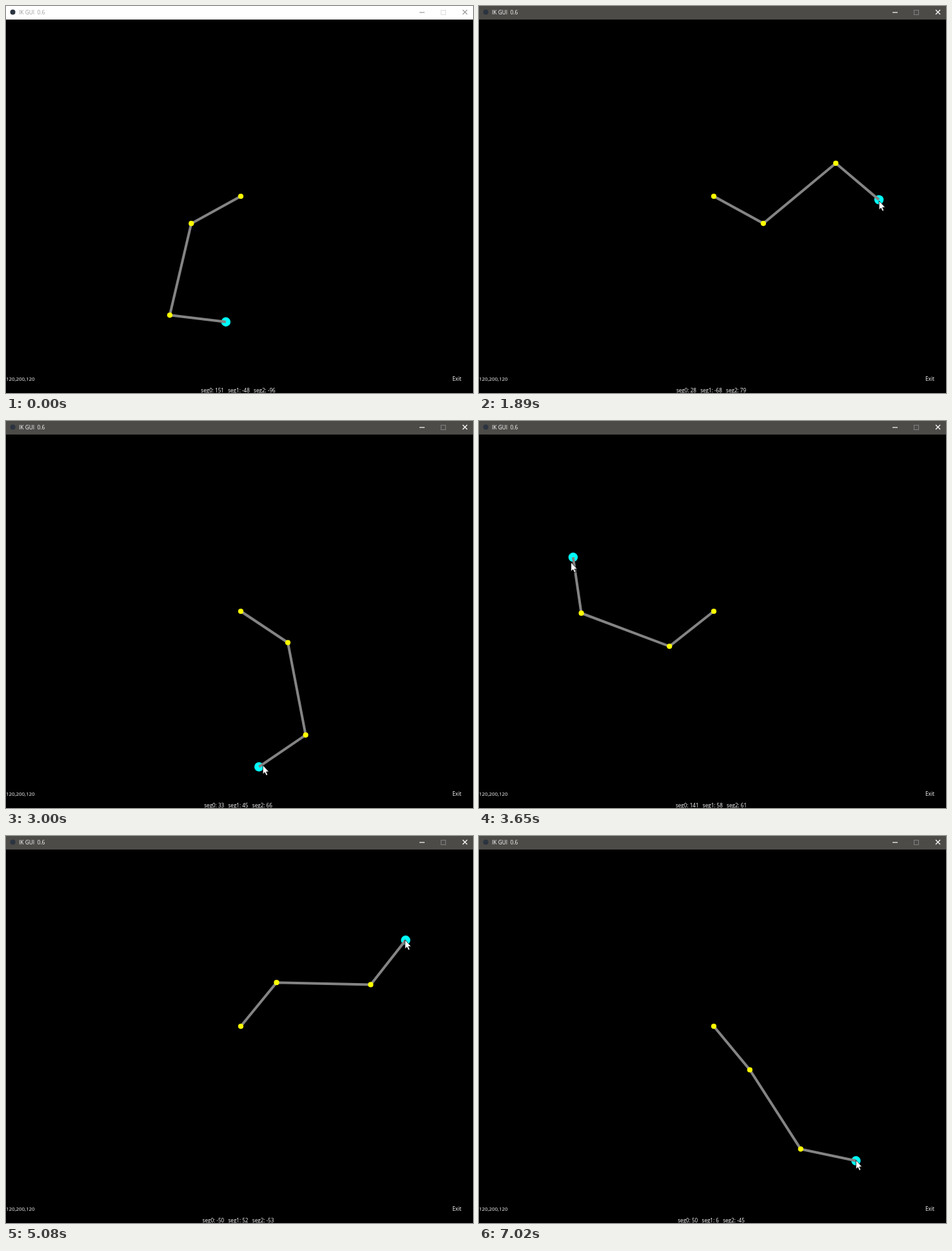
These frames come from a looping animation (724 px wide and 600 px high, 7.07 s). An HTML page with a canvas:

```html
<!DOCTYPE html>
<html lang="en">
<head>
<meta charset="utf-8">
<title>IK GUI</title>
<style>
html, body { margin: 0; width: 100%; height: 100%; overflow: hidden; background: #000; }
canvas { display: block; }
</style>
</head>
<body>
<canvas id="stage" width="724" height="600"></canvas>
<script>
const ctx = document.getElementById('stage').getContext('2d');
const LOOP = 7070, STEPS = 153, GRAB = 10;
const BASE = [364, 295], LENGTHS = [120, 200, 120].map(n => n * 0.73);

// Key poses of the drag: step, then each segment's relative angle in degrees
const POSES = [
  [GRAB, 151.2, -48, -96.4],
  [26, 120.1, -141.4, -45.3],
  [41, 28.7, -68.4, 79.9],
  [65, 33.6, 45.5, 66.6],
  [80, -225, 60, 60],
  [92, -83.7, 79.2, 36.5],
  [96, -35, 35, 20],
  [112, -50, 55, -60],
  [128, 1.6, 74, -74.8],
  [138, -35, 25, -40],
  [152, 50.4, 6.9, -45.3]
];

const clamp = (x, lo, hi) => Math.min(Math.max(x, lo), hi);

function slope(i, k) {
  const a = POSES[i - 1], b = POSES[i + 1];
  return a && b ? (b[k] - a[k]) / (b[0] - a[0]) : 0;
}

// Hermite interpolation through the key poses
function anglesAt(step) {
  const s = clamp(step, GRAB, STEPS - 1);
  const i = Math.max(0, POSES.findIndex(p => p[0] >= s) - 1);
  const a = POSES[i], b = POSES[i + 1], span = b[0] - a[0];
  const u = (s - a[0]) / span, v = 1 - u;
  return [1, 2, 3].map(k =>
    v * v * (1 + 2 * u) * a[k] + u * u * (3 - 2 * u) * b[k] +
    span * u * v * (v * slope(i, k) - u * slope(i + 1, k)));
}

function jointsFor(angles) {
  let [x, y] = BASE, heading = 0;
  const points = [[x, y]];
  angles.forEach((angle, i) => {
    heading += angle * Math.PI / 180;
    x += LENGTHS[i] * Math.cos(heading);
    y += LENGTHS[i] * Math.sin(heading);
    points.push([x, y]);
  });
  return points;
}

function dot([x, y], r, color) {
  ctx.fillStyle = color;
  ctx.beginPath();
  ctx.arc(x, y, r, 0, 7);
  ctx.fill();
}

function line(points, color, width) {
  ctx.strokeStyle = color;
  ctx.lineWidth = width;
  ctx.beginPath();
  points.forEach(p => ctx.lineTo(...p));
  ctx.stroke();
}

function text(str, x, y, color = '#fff', align = 'left', size = 8.1) {
  ctx.font = `${size}px "Open Sans", "Noto Sans", sans-serif`;
  ctx.textAlign = align;
  ctx.fillStyle = color;
  ctx.fillText(str, x, y);
}

function drawTitleBar(active) {
  const ink = active ? '#fff' : '#999';
  ctx.fillStyle = active ? '#4c4b48' : '#fff';
  ctx.fillRect(0, 0, 724, 21);
  dot([10.5, 9.5], 4, '#2c3440');
  text('IK GUI  0.6', 20, 13, ink, 'left', 8.4);
  line([[641, 10], [649, 10]], ink, 1.2);
  ctx.strokeStyle = active ? '#808080' : '#ddd';
  ctx.lineWidth = 1;
  ctx.strokeRect(674.5, 6.5, 7, 7);
  line([[708, 6], [715, 13]], ink, 1.2);
  line([[715, 6], [708, 13]], ink, 1.2);
}

function drawCursor(step) {
  if (step < 3) return;
  // The arm trails slightly behind the pointer
  const [x, y] = jointsFor(anglesAt(step + 0.3))[3];
  const away = Math.max(0, GRAB - step) / 7;
  ctx.save();
  ctx.translate(x + 60 * away, y + 100 * away * away);
  ctx.beginPath();
  [[0, -1], [0, 13], [3, 10.2], [5.2, 15], [7.6, 14], [5.4, 9.4], [9.5, 9.2]]
    .forEach(p => ctx.lineTo(...p));
  ctx.closePath();
  ctx.fillStyle = '#fff';
  ctx.fill();
  ctx.strokeStyle = '#000';
  ctx.lineWidth = 0.8;
  ctx.stroke();
  ctx.restore();
}

const whole = a => Math.trunc(a - 360 * Math.round(a / 360)) || 0;

function draw(step) {
  const angles = anglesAt(step), joints = jointsFor(angles);
  ctx.fillStyle = '#000';
  ctx.fillRect(0, 0, 724, 600);
  drawTitleBar(step >= GRAB);

  dot(joints[3], 7.2, '#0ff');
  line(joints, '#848484', 4);
  joints.slice(0, 3).forEach(p => dot(p, 4.1, '#ff0'));

  text('120,200,120', 0, 581, '#fff', 'left', 7.9);
  text('Exit', 699, 581, '#fff', 'center', 8.4);
  text(angles.map((a, i) => `seg${i}: ${whole(a)}`).join('   '), 360, 598.5, '#fff', 'center');
  drawCursor(step);
}

function tick(now) {
  const t = now % LOOP;
  draw(Math.min(STEPS - 1, Math.floor((t + 10) / LOOP * STEPS)));
  requestAnimationFrame(tick);
}
draw(0);
requestAnimationFrame(tick);
</script>
</body>
</html>
```
